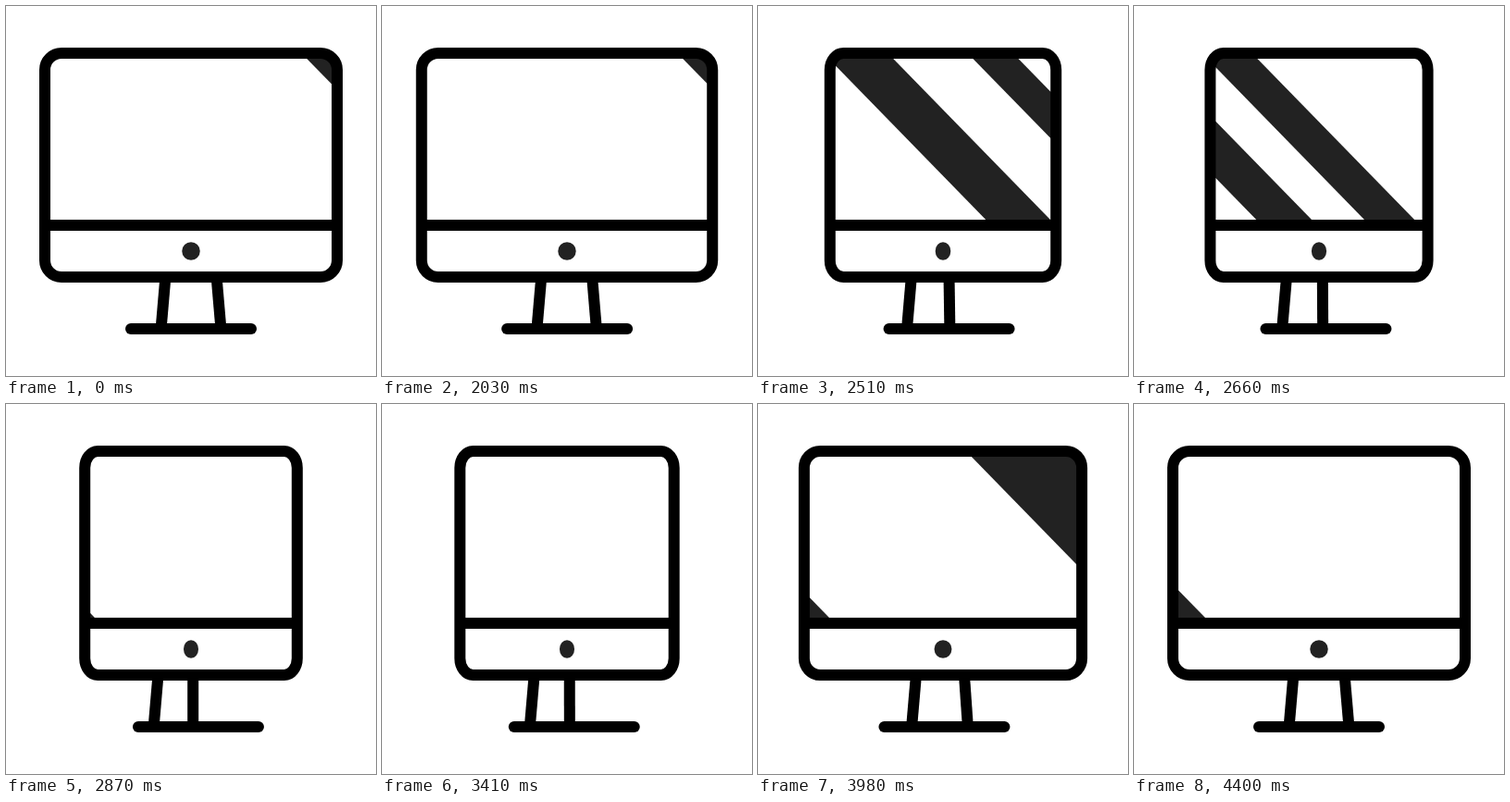
These frames come from a looping animation (400x400 px, 4430 ms). An HTML page without scripts:

```html
<!DOCTYPE html>
<html lang="en">
<head>
<meta charset="utf-8">
<title>Turning monitor</title>
<style>
  /* 0 = facing front, 1 = fully turned */
  @property --turn { syntax: "<number>"; inherits: true; initial-value: 0; }

  html, body { margin: 0; width: 100%; height: 100%; overflow: hidden; background: #fff; }

  svg {
    display: block; width: 100%; height: 100%;
    fill: none; stroke-width: 12px;
    animation: turn 4.43s infinite;
  }
  @keyframes turn {
    0%, 45.15% { --turn: 0; animation-timing-function: ease; }
    67.27%, 72.46% { --turn: 1; animation-timing-function: cubic-bezier(.65, 0, .35, 1); }
    99.55%, 100% { --turn: 0; }
  }

  .wide {
    x: calc(42px + 43.5px * var(--turn));
    width: calc(316px - 87px * var(--turn));
  }
  .frame { stroke: #000; rx: calc(18px - 4px * var(--turn)); ry: 18px; }
  .bar { fill: #000; }
  .button { fill: #222; rx: calc(9.75px - 1.75px * var(--turn)); ry: 9.75px; }

  .stand { stroke: #000; }
  .base { stroke-linecap: round; transform: translateX(calc(8px * var(--turn))); }
  .left { transform: translateX(calc(-8px * var(--turn))); }
  .right {
    transform: translate(calc(227.6px - 25.6px * var(--turn)), 293px)
               skewX(calc(4.9deg * (1 - var(--turn))));
  }

  /* Reflections: x is the left edge at the top of the bar */
  .shine { fill: #222; transform: translateY(231px) skewX(44.3deg); }
  .shine rect { animation: 4.43s linear infinite; }
  .first { animation-name: first !important; }
  .second { animation-name: second !important; }
  .back { animation-name: back !important; }
  @keyframes first {
    0%, 48.76% { x: 513px; width: 93px; }
    63.43%, 100% { x: 19px; width: 50px; }
  }
  @keyframes second {
    0%, 54.63% { x: 495px; width: 46px; }
    65.24%, 100% { x: 15px; width: 62px; }
  }
  @keyframes back {
    0%, 72.46% { x: -161px; animation-timing-function: cubic-bezier(.65, 0, .35, 1); }
    99.55%, 100% { x: 525px; }
  }
</style>
</head>
<body>
<svg viewBox="0 0 400 400">
  <clipPath id="screen">
    <rect class="wide" y="51" height="186" rx="14"/>
  </clipPath>

  <g class="stand">
    <path class="left" d="M172.4 293L167.6 349"/>
    <path class="right" d="M0 0V56"/>
    <path class="base" d="M135 349H265"/>
  </g>

  <g clip-path="url(#screen)">
    <g class="shine">
      <rect class="first" y="-190" height="200"/>
      <rect class="second" y="-190" height="200"/>
      <rect class="back" y="-190" width="146" height="200"/>
    </g>
  </g>

  <rect class="wide bar" y="231" height="12"/>
  <rect class="wide frame" y="51" height="242"/>
  <ellipse class="button" cx="200" cy="265"/>
</svg>
</body>
</html>
```
